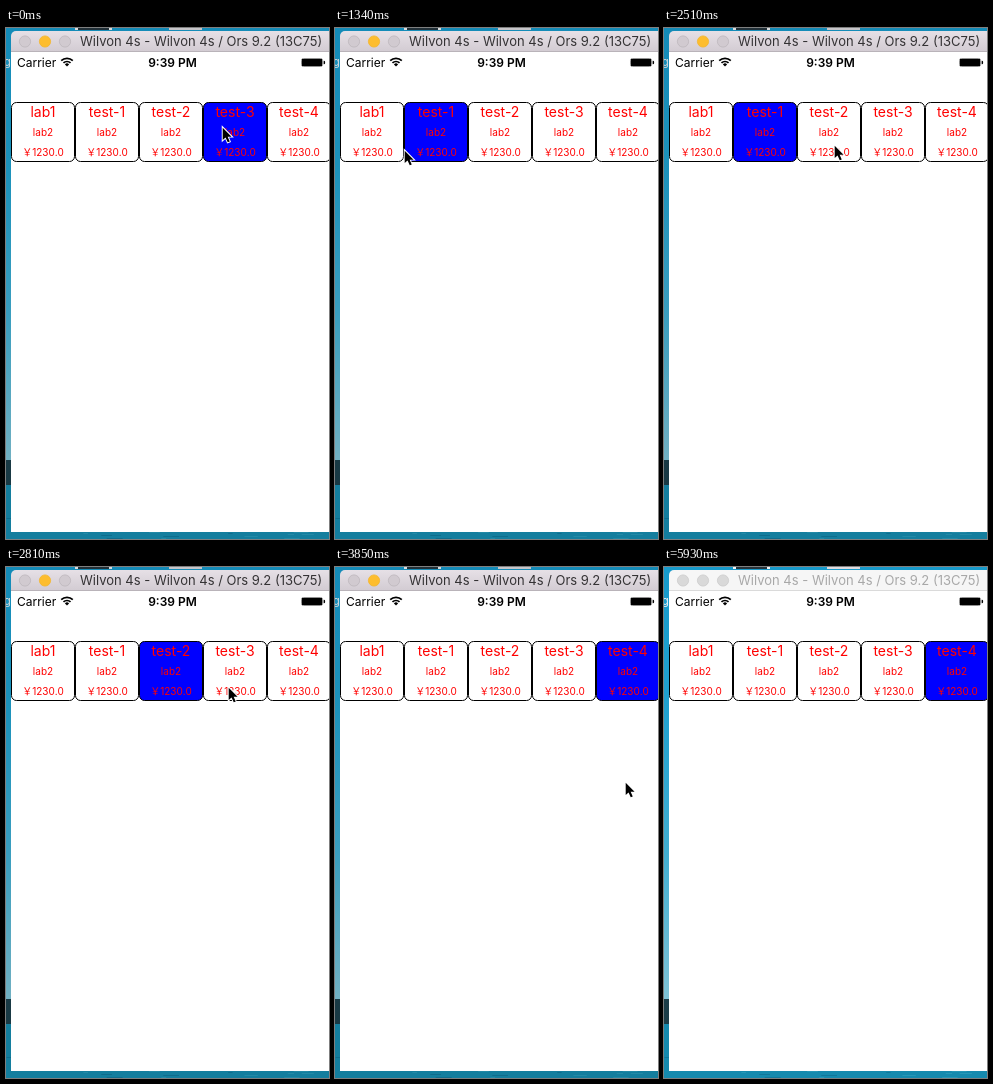
These frames come from a looping animation (323 px wide and 511 px high, 6.1 s). An HTML page with a canvas:

```html
<!DOCTYPE html>
<html lang="en">
<head>
<meta charset="utf-8">
<title>Price picker</title>
<style>
html, body { margin: 0; width: 100%; height: 100%; overflow: hidden; background: #fff; }
canvas { display: block; width: 323px; height: 511px; }
</style>
</head>
<body>
<canvas id="stage" width="323" height="511"></canvas>
<script>
const ctx = document.getElementById('stage').getContext('2d');
const W = 323, H = 511, LOOP = 6100, BLUR_AT = 5930;
const FONT = 'Inter, "Noto Sans CJK SC", "Noto Sans CJK JP", sans-serif';
const LABELS = ['lab1', 'test-1', 'test-2', 'test-3', 'test-4'];

// The pointer moves in beats; each click selects the neighbouring cell
const BEAT = 148, LAST_BEAT = 30;
const CLICKS = [3, 8, 10, 14, 18, 21, 24];
const PATH = [
  { beat: 0, x: 216, y: 98 }, { beat: 2, x: 171, y: 116 },
  { beat: 6, x: 87, y: 120 }, { beat: 8, x: 87, y: 120 },
  { beat: 10, x: 51, y: 122 }, { beat: 11, x: 67, y: 125 },
  { beat: 15, x: 106, y: 124 }, { beat: 17, x: 170, y: 116 },
  { beat: 19, x: 222, y: 119 }, { beat: 21, x: 222, y: 119 },
  { beat: 23, x: 296, y: 110 }, { beat: 25, x: 298, y: 118 },
  { beat: 29, x: 267, y: 503 }
];

function pointerAt(beat) {
  const i = PATH.findIndex(p => p.beat > beat);
  if (i < 0) return PATH.at(-1);
  const a = PATH[i - 1], b = PATH[i];
  const k = (beat - a.beat) / (b.beat - a.beat);
  return { x: Math.round(a.x + (b.x - a.x) * k), y: Math.round(a.y + (b.y - a.y) * k) };
}

// Cells are visited from the fourth down to the first, then up to the last
function selectedAt(beat) {
  return Math.abs(3 - CLICKS.filter(b => b <= beat).length);
}

function seeded(seed) {
  return () => (seed = (seed * 16807) % 2147483647) / 2147483647;
}

function rect(x, y, w, h, color) {
  ctx.fillStyle = color;
  ctx.fillRect(x, y, w, h);
}

function text(str, x, y, size, color, align = 'left', weight = 400) {
  ctx.font = `${weight} ${size}px ${FONT}`;
  ctx.textAlign = align;
  ctx.fillStyle = color;
  ctx.fillText(str, x, y);
}

function roundBox(x, y, w, h, r) {
  ctx.beginPath();
  ctx.roundRect(x, y, w, h, r);
}

function paint(fill, stroke, width = 1) {
  ctx.fillStyle = fill;
  ctx.fill();
  if (!stroke) return;
  ctx.strokeStyle = stroke;
  ctx.lineWidth = width;
  ctx.stroke();
}

function gradient(y0, y1, ...colors) {
  const g = ctx.createLinearGradient(0, y0, 0, y1);
  colors.forEach((c, i) => g.addColorStop(i / (colors.length - 1), c));
  return g;
}

function desktop(active) {
  rect(0, 0, W, 432, gradient(0, 432, '#18a0d2', '#22a8d6', '#45b6da', '#84cbde'));
  rect(0, 432, W, 25, '#1d3f4a');
  rect(0, 457, W, 54, '#1790b4');
  const rnd = seeded(7);
  for (let i = 0; i < 90; i++) {
    const tone = rnd() < 0.5 ? 'rgba(0, 50, 80, .2)' : 'rgba(110, 210, 225, .2)';
    rect(rnd() * W, 458 + Math.floor(rnd() * 53), 4 + rnd() * 12, 1, tone);
  }
  rect(69, 0, 37, 2, '#fff');
  rect(72, 0, 31, 2, '#26343b');
  rect(163, 0, 33, 2, '#e9e4e6');
  text('g', -2, 38, 11, '#fff');
  rect(0, 0, W, H, `rgba(0, 20, 35, ${active ? 0.15 : 0.04})`);
}

function titleBar(active) {
  roundBox(5, 3, 330, 30, [5, 0, 0, 0]);
  paint(active ? gradient(3, 24, '#e6e0e6', '#d2cbd2') : '#f6f6f6');
  rect(5, 23, W, 1, active ? '#b9b3b9' : '#dadada');
  [19, 39, 59].forEach((x, i) => {
    ctx.beginPath();
    ctx.arc(x, 13.5, 5.6, 0, Math.PI * 2);
    if (active && i === 1) paint('#fdbd2e', '#f3b52c', 0.8);
    else if (active) paint('#d1cad0', '#bdb6bc', 0.8);
    else paint('#d9d9d9', '#cbcbcb', 0.8);
  });
  text('Wilvon 4s - Wilvon 4s / Ors 9.2 (13C75)', 74, 18, 13, active ? '#343234' : '#a8a8a8');
}

function wifi(x, y) {
  const from = -Math.PI * 0.75, to = -Math.PI * 0.25;
  ctx.strokeStyle = '#000';
  ctx.lineWidth = 1.7;
  for (const r of [5, 8.2]) {
    ctx.beginPath();
    ctx.arc(x, y, r, from, to);
    ctx.stroke();
  }
  ctx.beginPath();
  ctx.moveTo(x, y);
  ctx.arc(x, y, 3, from, to);
  paint('#000');
}

function statusBar() {
  text('Carrier', 11, 38.5, 12, '#000');
  wifi(61, 38.5);
  text('9:39 PM', 166.5, 38.5, 12, '#000', 'center', 600);
  roundBox(295.5, 30.5, 21, 8, 1.8);
  paint('#fff', '#777', 0.8);
  rect(296, 31, 20, 7, '#000');
  roundBox(317.6, 32.8, 1.5, 3.4, [0, 1.2, 1.2, 0]);
  paint('#000');
}

function cell(label, i, selected) {
  const x = 5 + i * 64, mid = x + 32;
  roundBox(x + 0.5, 74.5, 63, 59, 5);
  paint(selected ? '#00f' : '#fff', '#000');
  text(label, mid, 89, 14, '#f00', 'center');
  text('lab2', mid, 107.5, 10, '#f00', 'center');
  text('￥1230.0', mid, 127.7, 10, '#f00', 'center');
}

const ARROW = new Path2D('M0 0V14.2L3.3 11.2L5.8 16.8L8.1 15.8L5.7 10.3H10.2Z');

function pointer({ x, y }) {
  ctx.save();
  ctx.translate(x + 0.7, y + 1.7);
  ctx.scale(0.87, 0.87);
  ctx.strokeStyle = '#fff';
  ctx.lineWidth = 2.2;
  ctx.stroke(ARROW);
  ctx.fillStyle = '#000';
  ctx.fill(ARROW);
  ctx.restore();
}

function draw(t) {
  const active = t < BLUR_AT;
  const beat = Math.floor((t + 8) / BEAT);
  desktop(active);
  titleBar(active);
  rect(5, 24, W, 480, '#fff');
  statusBar();
  LABELS.forEach((label, i) => cell(label, i, i === selectedAt(beat)));
  if (beat < LAST_BEAT) pointer(pointerAt(beat));
}

const start = performance.now();
function tick() {
  draw((performance.now() - start) % LOOP);
  requestAnimationFrame(tick);
}
tick();
</script>
</body>
</html>
```
